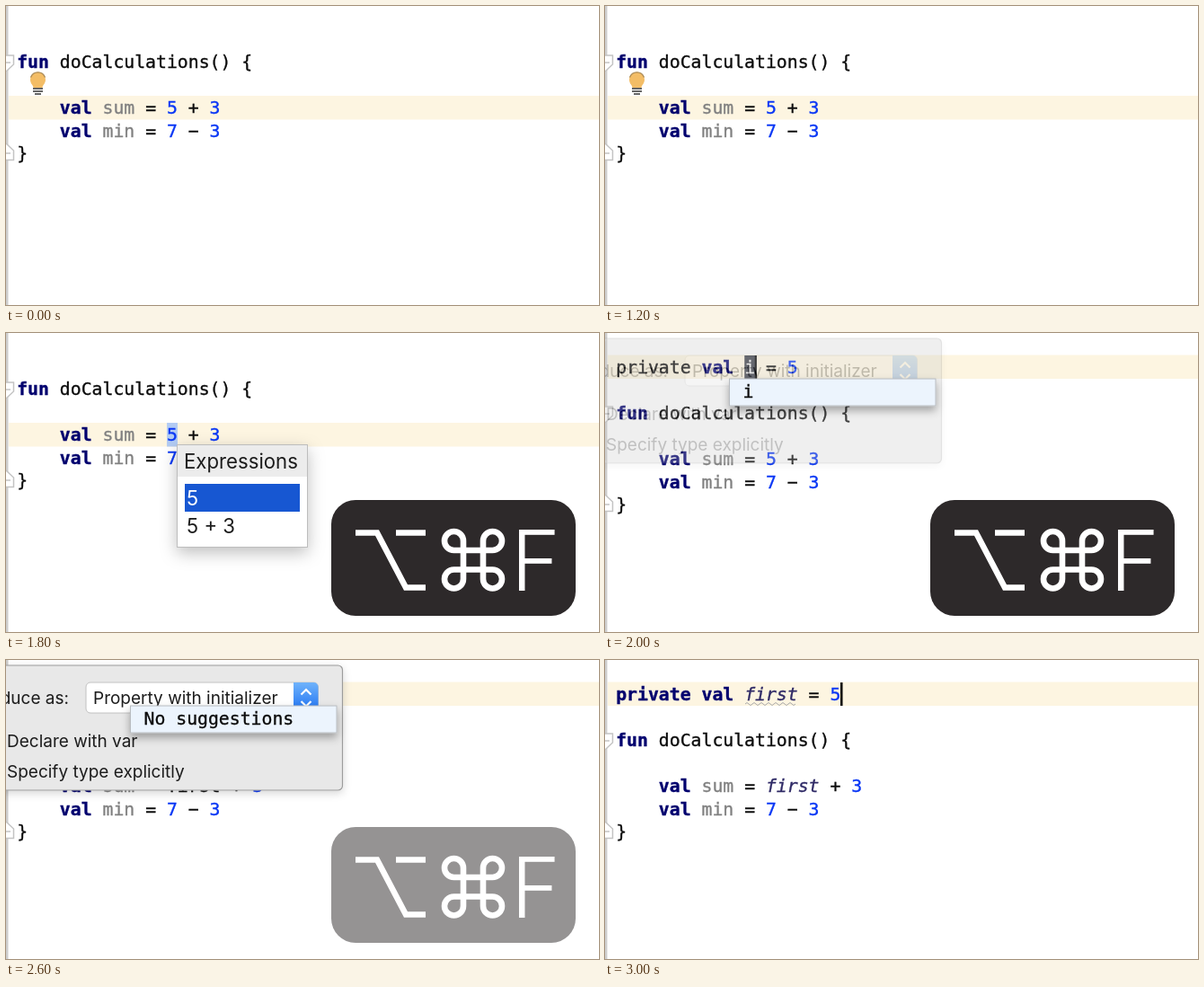
An HTML page that plays this animation: 660x333 px, repeating every 4000 ms.

```html
<!DOCTYPE html>
<html lang="en">
<head>
<meta charset="utf-8">
<title>Extract property</title>
<style>
  html, body { margin: 0; width: 100%; height: 100%; overflow: hidden; background: #fff; }
  svg { display: block; width: 660px; height: 333px; }
  text { white-space: pre; }
  .mono { --ink: #0c0c0c; font: 19.8px "DejaVu Sans Mono", monospace; }
  .mono, .mono tspan { fill: var(--ink); stroke: var(--ink); stroke-width: .35; }
  .ui { font: 19px Inter, sans-serif; fill: #1c1c1c; }
  .list { font-size: 22.2px; }
  .kw { --ink: #00006e; font-weight: bold; }
  .num { --ink: #0a37f5; }
  .dim { --ink: #808080; }
  .prop { --ink: #2f2a66; font-style: italic; }
  .light { --ink: #eee; }
  .row { fill: #fdf5e1; }
  .fold { fill: #fff; stroke: #c4c4c4; stroke-width: 1.5; }
  .key { fill: none; stroke: #fff; stroke-width: 6.6; }
</style>
</head>
<body>
<svg viewBox="0 0 660 333">
  <defs>
    <filter id="soft" x="-30%" y="-40%" width="160%" height="190%">
      <feDropShadow dx="0" dy="6" stdDeviation="9" flood-opacity=".25"/>
    </filter>
    <filter id="faint" x="-10%" y="-20%" width="120%" height="150%">
      <feDropShadow dx="0" dy="3" stdDeviation="5" flood-opacity=".16"/>
    </filter>
    <filter id="low" x="-10%" y="-30%" width="120%" height="220%">
      <feDropShadow dx="0" dy="5" stdDeviation="5" flood-opacity=".32"/>
    </filter>
    <linearGradient id="blue" x2="0" y2="1">
      <stop stop-color="#6fb3fb"/><stop offset="1" stop-color="#1a6ff2"/>
    </linearGradient>
  </defs>

  <rect width="660" height="333" fill="#fff"/>
  <rect width="2.5" height="333" fill="#cdcdcd"/>
  <g id="code"></g>

  <g id="bulb">
    <path d="M30.5 91C30 87.5 27 86.5 27 82a8.500 8.500 0 0 1 17 0C44 86.500 41 87.500 40.500 91Z" fill="#f3bd66"/>
    <path d="M27.500 79.500a8.500 8.500 0 0 1 16 0" fill="none" stroke="#a98a58" stroke-width="1.300"/>
    <path d="M30 92h11M30 95h11M32 98h7" stroke="#666" stroke-width="1.800"/>
  </g>

  <g id="chooser">
    <g filter="url(#soft)">
      <rect x="190.5" y="124.500" width="145" height="114" fill="#fff" stroke="#bdbdbd"/>
    </g>
    <rect x="191" y="125" width="144" height="35" fill="#ececec"/>
    <rect x="199" y="168" width="128" height="31" fill="#1757d2"/>
    <g class="ui list">
      <text x="198" y="151">Expressions</text>
      <text x="201" y="192" fill="#fff">5</text>
      <text x="201" y="223">5 + 3</text>
    </g>
  </g>

  <g id="dialog">
    <g filter="url(#faint)">
      <rect x="-20" y="6" width="394.500" height="139" rx="5" fill="#e8e8e8" stroke="#9c9c9c" stroke-width="1.200"/>
    </g>
    <rect x="89" y="25" width="258.500" height="34" rx="5" fill="#fff" stroke="#c2c2c2"/>
    <path d="M320 25h22.500a5 5 0 0 1 5 5v24a5 5 0 0 1-5 5H320Z" fill="url(#blue)"/>
    <path d="M328.500 38.500l5.500-5.500 5.500 5.500M328.500 46l5.500 5.500 5.500-5.500" fill="none" stroke="#fff" stroke-width="2.200"/>
    <g class="ui">
      <text x="70" y="48.500" text-anchor="end">Introduce as:</text>
      <text x="97" y="48.500">Property with initializer</text>
      <text x="1" y="96.500">Declare with var</text>
      <text x="1" y="130.500">Specify type explicitly</text>
    </g>
  </g>
  <rect id="shade" y="6" width="374.500" height="139" rx="5"/>

  <g id="hints">
    <g filter="url(#low)">
      <rect x="138.500" y="51" width="229.500" height="30" fill="#ecf4fd" stroke="#b8bcc0"/>
    </g>
    <text id="hintText" class="mono" x="153.500" y="72"></text>
  </g>

  <g id="keys">
    <rect x="362" y="186" width="272" height="129" rx="27" fill="#2d292a"/>
    <path class="key" d="M389 222.500h24L445 283.500h22M434 222.500h33"/>
    <path class="key" d="M509 231.500V274a10.500 10.500 0 1 1-10.500-10.500H541.500a10.500 10.500 0 1 1-10.500 10.500V231.500a10.500 10.500 0 1 1 10.500 10.500H498.500a10.500 10.500 0 1 1 10.500-10.500Z"/>
    <text x="562" y="287" style="font:300 93.5px Inter,sans-serif" fill="#fff">F</text>
  </g>
</svg>

<script>
const LOOP = 4000, LEFT = 12.2, COL = 11.92, LEADING = 25.5;
const $ = id => document.getElementById(id);
const rect = (x, y, w, h, attrs) =>
  `<rect x="${x}" y="${y}" width="${w}" height="${h}" ${attrs}/>`;

const styles = { fun: 'kw', val: 'kw', sum: 'dim', min: 'dim' };
const highlight = (line, extra) => line.replace(/\w+/g, word => {
  const style = /^\d+$/.test(word) ? 'num' : extra[word] || styles[word];
  return style ? `<tspan class="${style}">${word}</tspan>` : word;
});

const body = value =>
  ['fun doCalculations() {', '', `    val sum = ${value} + 3`, '    val min = 7 \u2212 3', '}'];

// Fold markers sit beside the first and last line of the function.
const folds = y => `
  <path class="fold" d="M0 ${y - 14}H8.500V${y - 4}L0 ${y + 4}M0 ${y - 6}h5"/>
  <path class="fold" d="M0 ${y + 84}L8.500 ${y + 92}V${y + 102.5}H0M0 ${y + 95}h5"/>`;

function editor(lines, top, rowY, { extra = {}, under = '', over = '' } = {}) {
  const start = top + lines.findIndex(l => l.startsWith('fun')) * LEADING;
  const text = lines.map((line, i) =>
    `<text class="mono" x="${LEFT}" y="${top + i * LEADING}">${highlight(line, extra)}</text>`);
  return rect(3, rowY, 657, 26.5, 'class="row"') + under + folds(start) + text.join('') + over;
}

const withProperty = (name, value, options) =>
  editor([`private val ${name} = 5`, '', ...body(value)], 45, 24.5, options);

const caret = rect(262, 25, 2.5, 26, 'fill="#000"');
const wave = `<path d="M156 49q2-3 4 0${'t4 0'.repeat(13)}" fill="none" stroke="#aaa"/>`;
const nameX = LEFT + 12 * COL;

const code = {
  plain: editor(body('5'), 69, 100),
  picked: editor(body('5'), 69, 100, {
    under: rect(LEFT + 14 * COL, 100, COL, 26.5, 'fill="#b2cbf3"')
  }),
  naming: withProperty('i', '5', {
    under: rect(nameX, 25, 13.5, 26, 'fill="#3b3e48"'),
    over: `<text class="mono light" x="${nameX}" y="45">i</text>` +
      rect(nameX + 11.5, 25, 2, 26, 'fill="#000"')
  }),
  named: withProperty('first', 'first', { over: caret }),
  done: withProperty('first', 'first', {
    extra: { private: 'kw', first: 'prop' }, over: wave + caret
  })
};

const steps = [
  { at: 0, code: 'plain', bulb: 1 },
  { at: 1400, code: 'picked', chooser: 1, keys: 1 },
  { at: 2000, code: 'naming', dialog: .24, shade: .04, hint: 'i', keys: 1 },
  { at: 2200, code: 'naming', dialog: 1, hint: 'i', keys: 1 },
  { at: 2400, code: 'naming', dialog: 1, hint: 'No suggestions', keys: 1 },
  { at: 2600, code: 'named', dialog: 1, hint: 'No suggestions', keys: .5 },
  { at: 2800, code: 'named', dialog: .4, shade: .08 },
  { at: 3000, code: 'done' }
];

let shown;
function show(step) {
  if (step === shown) return;
  shown = step;
  $('code').innerHTML = code[step.code];
  for (const id of ['bulb', 'chooser', 'dialog', 'shade', 'keys']) {
    $(id).style.opacity = step[id] || 0;
  }
  $('hints').style.opacity = step.hint ? 1 : 0;
  $('hintText').textContent = step.hint || '';
}

const origin = performance.now();
function tick() {
  const time = Math.max(0, performance.now() - origin) % LOOP;
  show(steps.findLast(step => step.at <= time));
  requestAnimationFrame(tick);
}
tick();
</script>
</body>
</html>
```
